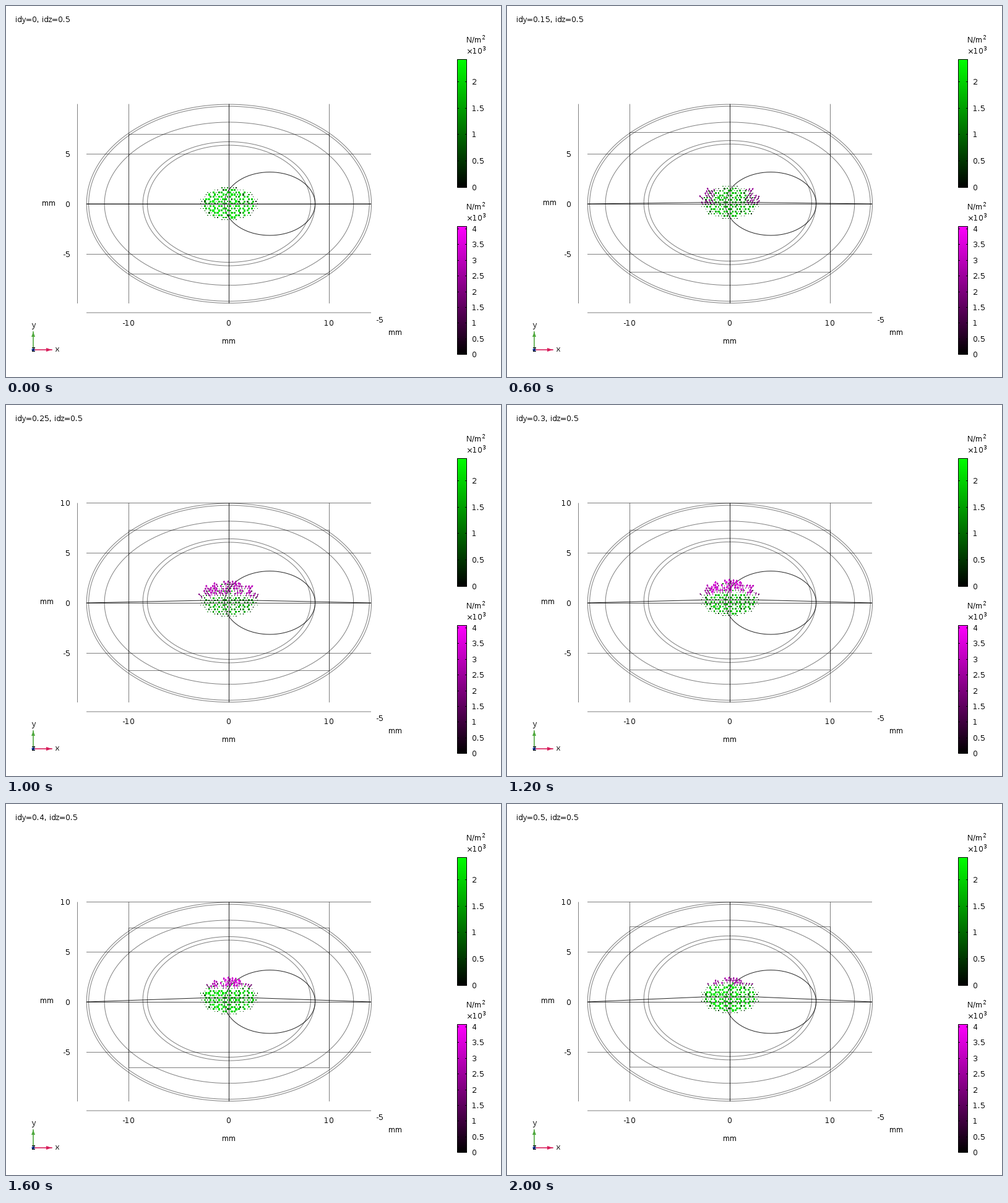
A matplotlib script for the animation above (2200 ms loop, 800x600 px).

```python
import numpy as np
import matplotlib.pyplot as plt
from matplotlib.animation import FuncAnimation
from matplotlib.collections import LineCollection
from matplotlib.patches import Ellipse, Polygon, Rectangle

DPI = 100
PX = 72 / DPI
STEPS, STEP_MS = 11, 200
SCALE = 16.2            # pixels per millimetre
CX, CY = 360.4, 319.8
RX, RY = 46.5, 26.0     # arrow disc radii
THETA = np.linspace(0, 2 * np.pi, 241)

plt.rcParams["font.family"] = "DejaVu Sans"
plt.rcParams["text.hinting"] = "default"
plt.rcParams["text.hinting_factor"] = 1
fig = plt.figure(figsize=(8, 6), dpi=DPI, facecolor="white")
ax = fig.add_axes([0, 0, 1, 1])
ax.set_xlim(0, 800)
ax.set_ylim(600, 0)
ax.axis("off")


def line(xs, ys, alpha=0.5, z=3):
    return ax.plot(xs, ys, color="black", alpha=alpha, lw=PX, zorder=z,
                   solid_capstyle="butt", snap=False)[0]


def oval(cx, cy, rx, ry, alpha=0.5):
    return line(cx + rx * np.cos(THETA), cy + ry * np.sin(THETA), alpha, 1)


def label(x, y, s, ha="center", px=12):
    return ax.text(x, y, s, ha=ha, va="baseline", fontsize=px * PX, zorder=6)


def colorbar(top, rgb, vmax, ticks):
    bottom = top + 208
    ramp = np.linspace(1, 0, 256)[:, None, None] * np.array(rgb)
    ax.imshow(ramp, extent=(729.5, 744.5, bottom, top), aspect="auto",
              interpolation="bilinear", zorder=2)
    ax.add_patch(Rectangle((729.5, top + 0.5), 15, 207, fill=False,
                           ec="black", lw=PX, zorder=4, snap=False))
    for v in ticks:
        y = bottom - 0.5 - v / vmax * 207
        row = np.floor(y) + 0.5
        line([730, 732], [row, row], 1, 4)
        line([742, 744], [row, row], 1, 4)
        label(753, y + 4.5, f"{v:g}", "left")
    label(744, top - 27, "N/m", "left")
    label(769, top - 32, "2", "left", 9)
    label(744, top - 9, "×10", "left")
    label(770, top - 14, "3", "left", 9)


def triad():
    for color, pts in (("#4fa83d", [(44, 527), (41, 535), (47, 535)]),
                       ("#d81e5b", [(74, 556), (65, 553), (65, 559)])):
        tip = pts[0]
        ax.plot([44, tip[0]], [556, tip[1]], color=color, lw=1.6 * PX,
                zorder=4, snap=False)
        ax.add_patch(Polygon(pts, fc=color, ec="none", zorder=5))
    ax.add_patch(Ellipse((44, 556), 5, 5, fc="#2447b5", ec="none", zorder=5))
    label(44, 520, "y")
    label(82.5, 559, "x")
    label(44, 559, "z")


# Fixed geometry
for rx, ry in ((230.2, 160.8), (226.8, 157.6), (201.3, 131.9)):
    oval(CX, CY, rx, ry)
oval(426.3, CY, 73.3, 51.2, 0.85)

for x in (115.5, 198.5, 522.5):
    line([x, x], [158.5, 481])
line([360.5, 360.5], [158.5, 481], 0.85)
for y in (239.5, 401.5, 496):
    line([130, 590], [y, y])
line([130, 590], [320.5, 320.5], 0.7)
top_line = line([130, 590], [158.5, 158.5])

# Moving geometry
RIM_RADII = ((139.2, 100.3), (132, 94.7))
rims = [oval(CX, CY, rx, ry) for rx, ry in RIM_RADII]
frame_box = line([198.5, 522.5, 522.5, 198.5, 198.5], [0] * 5)
chord = line([130, 315, 407, 590], [320] * 4, 0.85)

# Labels
caption = label(15, 26, "", "left")
x_labels = [label(198, 517, "-10"), label(360, 517, "0"), label(522, 517, "10"),
            label(360, 546, "mm"), label(604, 512, "-5"), label(629, 532, "mm")]
x_base = [t.get_position()[1] for t in x_labels]
for y, s in ((244, "5"), (325, "0"), (406, "-5")):
    label(104, y, s, "right")
ten = label(104, 163, "10", "right")
y_unit = label(69, 323, "mm")

colorbar(86, (0, 1, 0), 2.42, (0, 0.5, 1, 1.5, 2))
colorbar(356, (1, 0, 1), 4.08, (0, 0.5, 1, 1.5, 2, 2.5, 3, 3.5, 4))
triad()


def honeycomb(a=4.6, h=3.7):
    """Triangular grid inside the disc; every third point is a cell centre."""
    pts = []
    for j in range(-8, 9):
        for i in range(-12, 13):
            x, y = (i + (j % 2) / 2) * a, j * h
            if (x / RX) ** 2 + (y / RY) ** 2 <= 1.06:
                pts.append((x, y, (i - j // 2 - j) % 3 == 0))
    return np.array(pts)


GRID = honeycomb()
U, V = GRID[:, 0] / RX, -GRID[:, 1] / RY
HOLE = GRID[:, 2] > 0
EDGE = np.hypot(U, V) > 0.93
rng = np.random.default_rng(4)
SHADE, TURN, PICK = rng.random((3, len(GRID)))

dots = ax.scatter(GRID[:, 0], GRID[:, 1], marker="s", linewidths=0, zorder=2)
arrows = LineCollection([], linewidths=PX, zorder=2.5)
ax.add_collection(arrows)


def contact(k):
    """Pressure per grid point: starts at both flanks, then gathers at the top."""
    keys = (2, 3, 4, 6, 8, 10)
    focus = np.interp(k, keys, (0.95, 0.82, 0.66, 0.25, 0, 0))
    low = np.interp(k, keys, (0.2, -0.1, 0.1, 0.36, 0.56, 0.72))
    power = np.interp(k, keys, (0, 0.4, 0.55, 0.9, 0.95, 0.6))
    spread = np.interp(k, keys, (0.2, 0.3, 0.45, 0.75, 0.75, 0.8))
    near = np.clip(1.15 - (np.abs(np.abs(U) - focus) / spread) ** 2, 0, 1)
    return np.where(V > low - 0.15 * np.abs(U), power * near, 0)


def arrow_path(x, y, dx, dy):
    tx, ty = x + dx, y + dy
    bx, by = -0.3 * dx, -0.3 * dy
    return [(x, y), (tx, ty), (tx + bx - 0.6 * by, ty + by + 0.6 * bx),
            (tx, ty), (tx + bx + 0.6 * by, ty + by - 0.6 * bx)]


def update(k):
    idy = 0.05 * k
    lift = SCALE * idy
    caption.set_text(f"idy={idy:.2g}, idz=0.5")

    # The tissue follows less at the sides than above and below
    drift = idy * (8 + 4.5 * np.sin(THETA) ** 2)
    for rim, (rx, ry) in zip(rims, RIM_RADII):
        rim.set_ydata(CY + ry * np.sin(THETA) - drift)
    top, bottom = np.floor([207 - lift, 433.4 - lift]) + 0.5
    frame_box.set_ydata([top, top, bottom, bottom, top])
    chord.set_ydata([320, 320.2 - lift, 320.2 - lift, 320])

    tilted = k >= 4
    top_line.set_visible(tilted)
    ten.set_visible(tilted)
    y_unit.set_position((66 if tilted else 69, 322 if k >= 3 else 323))
    for t, y in zip(x_labels, x_base):
        t.set_y(y - (1 if k >= 5 else 0))

    press = contact(k)
    hot = (press > 0.12) & (PICK < 0.75)
    xs, ys = CX + GRID[:, 0], CY + GRID[:, 1] - lift

    dim = 0.2 * np.exp(-((k - 4.5) / 2) ** 2)
    size = np.where(HOLE, 1.1, 3.5 - 0.8 * SHADE - 2 * dim)
    size = np.where(EDGE, 1.3, size - np.where(HOLE, 0, 1.8 * press))
    size = np.where(HOLE & ~EDGE & (PICK > 0.35 + 1.5 * dim), 0, size)
    green = np.where(HOLE, 0.15, 0.95 - 0.25 * SHADE - dim)
    green = np.where(~HOLE & (PICK > 0.88), 0.4, green)
    green = np.where(EDGE, 0.5 * SHADE, green)
    dots.set_offsets(np.column_stack([xs, ys]))
    dots.set_sizes((size * PX) ** 2)
    dots.set_facecolors(np.column_stack([0 * green, green, 0 * green]))

    paths, colors = [], []
    for n in np.flatnonzero(hot):
        length = (2.5 + 6 * press[n]) * (0.6 + 0.4 * SHADE[n])
        angle = 0.5 * U[n] + 0.6 * (TURN[n] - 0.5)
        paths.append(arrow_path(xs[n], ys[n], length * np.sin(angle),
                                -length * np.cos(angle)))
        m = 0.35 + 0.6 * press[n] * (0.5 + 0.5 * SHADE[n])
        colors.append((m, 0, m))
    arrows.set_segments(paths)
    arrows.set_color(colors or "none")
    return []


anim = FuncAnimation(fig, update, frames=STEPS, interval=STEP_MS,
                     repeat=True, repeat_delay=0, blit=False)
plt.show()
```
